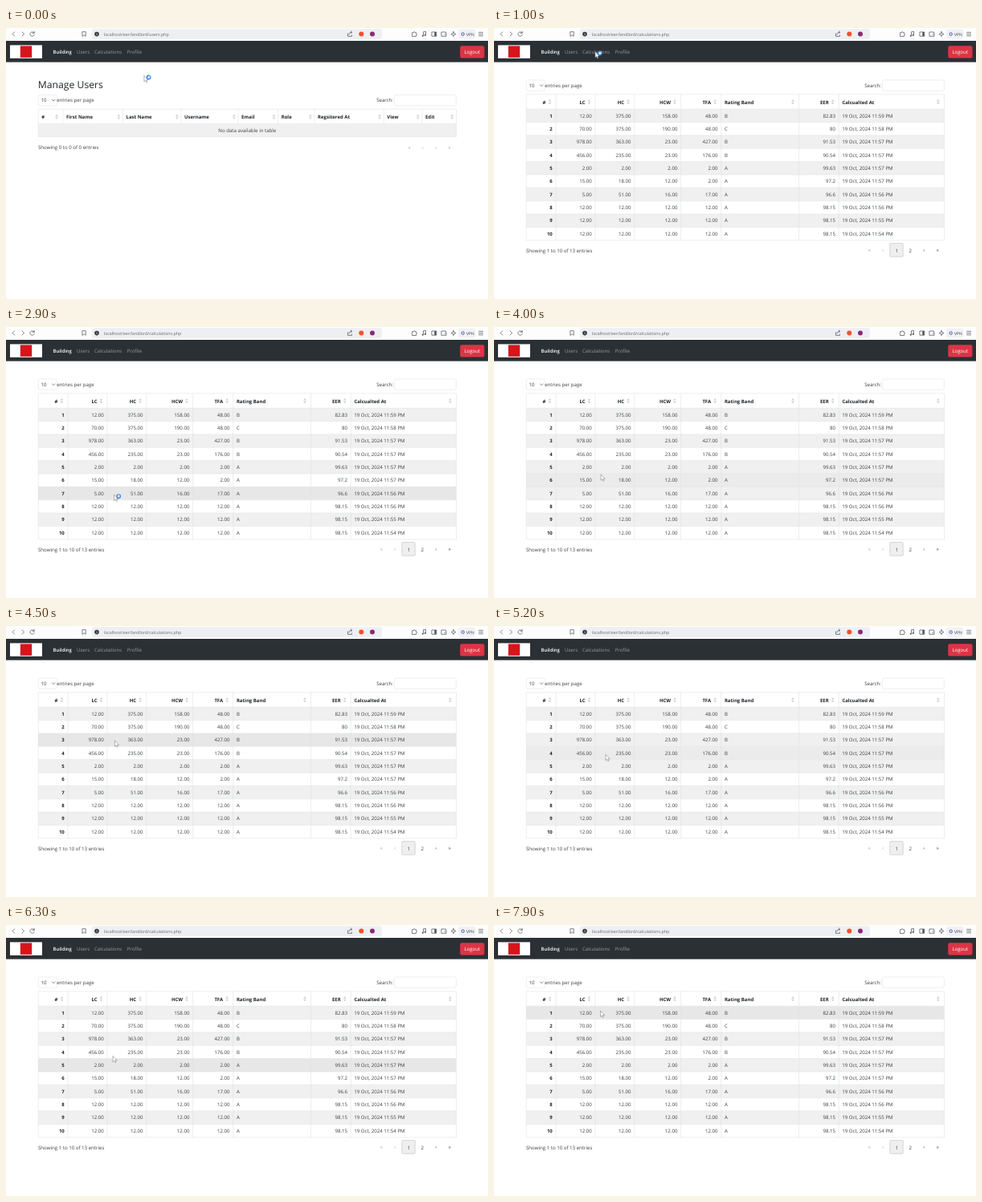
An HTML page that plays this animation: 600x338 px, repeating every 8000 ms.

```html
<!DOCTYPE html>
<html lang="en">
<head>
<meta charset="utf-8">
<title>Landlord dashboard</title>
<style>
html, body { margin: 0; width: 100%; height: 100%; overflow: hidden; background: #fff; }
svg { display: block; width: 100vw; height: 100vh; }
text { font-family: "Open Sans", "Noto Sans", sans-serif; font-size: 6.12px; fill: #3a3e42; text-rendering: geometricPrecision; white-space: pre; }
.b { font-weight: 700; font-size: 6px; fill: #212529; }
.r { text-anchor: end; }
.m { text-anchor: middle; }
.h2 { font-size: 12.2px; font-weight: 500; fill: #212529; }
.nav { font-size: 6.05px; fill: #9b9d9f; }
.on { fill: #fff; font-weight: 600; font-size: 5.95px; }
.url { font-size: 5.28px; fill: #63666b; }
.off { fill: #a0a4a8; }
.line { fill: none; stroke: #dfe2e5; stroke-width: .6; }
.icon { fill: none; stroke: #55585e; stroke-width: .75; stroke-linecap: round; stroke-linejoin: round; }
</style>
</head>
<body>
<svg id="stage" viewBox="0 0 600 338" preserveAspectRatio="none"></svg>
<script>
const LOOP = 8000, SWITCH = 900, BUSY_END = 3250, HOVER_LAG = 50;
const TOP = 101.2, ROW = 16.36;

// time, x, y of the pointer tip
const PATH = [
  [0, 172, 59.5], [600, 124, 28], [900, 126, 29], [1300, 126, 31], [1400, 126, 31],
  [2000, 130, 138], [2100, 130, 144], [2300, 132, 190], [2900, 134.5, 209],
  [3200, 135, 238], [3400, 136, 257], [3600, 136, 250], [4000, 133, 184],
  [4100, 133, 164], [4300, 134, 108], [4600, 136, 160], [5000, 139, 110],
  [5130, 139, 154], [5200, 139, 160], [5600, 138, 256], [5900, 137, 252],
  [6300, 133, 163.5], [6700, 133, 109], [6900, 132.6, 107], [8000, 132.6, 107]
];

const text = (x, y, s, cls = "") => `<text x="${x}" y="${y}" class="${cls}">${s}</text>`;
const rect = (x, y, w, h, fill, extra = "") =>
  `<rect x="${x}" y="${y}" width="${w}" height="${h}" fill="${fill}" ${extra}/>`;
const path = (d, cls, extra = "") => `<path d="${d}" class="${cls}" ${extra}/>`;
const dot = (x, y, r, fill) => `<circle cx="${x}" cy="${y}" r="${r}" fill="${fill}"/>`;
const icon = d => path(d, "icon");
const sort = (x, y) =>
  `<path d="M${x - 1.8} ${y - .6}h3.6l-1.8-2.5zM${x - 1.8} ${y + .6}h3.6l-1.8 2.5z" fill="#cbcdcf"/>`;

function browser() {
  return rect(0, 0, 600, 16, "#fdfdfe") +
    rect(107, 1.3, 361, 12.6, "#eeeff2", 'rx="3"') +
    icon("M10.5 5L8 7.5l2.5 2.5M20 5l2.5 2.5L20 10") +
    icon("M35 6.2a2.7 2.7 0 1 0 .2 2.3M35.2 4.4v2h-2") +
    icon("M95.3 4.7h3.9v5.6l-2-1.6-1.9 1.6z") +
    dot(113, 7.6, 2.8, "#35383d") + rect(112.7, 7.2, .7, 1.9, "#fff") + rect(112.7, 5.9, .7, .7, "#fff") +
    icon("M425.5 7v3.4h5V9M427 8c.2-2 1.4-2.7 3.6-2.7M429.2 3.9l1.5 1.4-1.5 1.4") +
    dot(442.3, 7.6, 3, "#f4512c") + dot(456, 7.6, 3, "#8c2a78") +
    icon("M506 5.6h1.4a.9.9 0 0 1 1.8 0h1.3v1.6a.9.9 0 0 1 0 1.8v1.5H506z") +
    icon("M519.5 9.6V4.8l3-.6v4.7") + dot(518.7, 9.8, 1, "#55585e") + dot(521.7, 9.1, 1, "#55585e") +
    icon("M530.3 5h5.4v5.2h-5.4z") + rect(533.3, 5, 2.4, 5.2, "#55585e") +
    icon("M542.3 5h5v1.2h.7v4.1h-5.7zM546 8.2h1") +
    icon("M557 4.6l.8 2.1 2.2.9-2.2.9-.8 2.1-.8-2.1-2.2-.9 2.2-.9z") +
    rect(563.2, 1.8, 21.2, 11.6, "#f0f1f5", 'rx="3"') +
    `<circle cx="568.7" cy="7.6" r="1.7" fill="none" stroke="#4a55a0" stroke-width="1"/>` +
    `<text x="573" y="9.5" style="font-size:5px">VPN</text>` +
    icon("M588.6 5.4h5M588.6 7.6h5M588.6 9.8h5");
}

function navbar() {
  return rect(0, 16, 600, 26.6, "#2b3035") +
    rect(5, 21.4, 40, 16.4, "#fff") + rect(17.8, 22.4, 14.4, 14.4, "#d8141c") +
    text(58.5, 32.1, "Building", "nav on") + text(88, 32.1, "Users", "nav") +
    text(110, 32.1, "Calculations", "nav") + text(150.7, 32.1, "Profile", "nav") +
    rect(565.3, 22.2, 30.2, 15.2, "#dc3545", 'rx="2.2"') +
    `<text x="580.3" y="32.1" class="m" style="fill:#fff;font-weight:500">Logout</text>`;
}

function controls(y) {
  return rect(40.2, y, 23, 13.4, "#fff", 'class="line" rx="2"') +
    text(43.4, y + 8.9, "10") +
    path(`M57.4 ${y + 6}l1.7 1.7 1.7-1.7`, "icon") +
    text(63.2, y + 8.9, "entries per page") +
    text(482, y + 8.9, "Search:", "r") +
    rect(483.4, y, 77, 13.4, "#fff", 'class="line" rx="2"');
}

const grid = (xs, top, bottom, ys) =>
  path(xs.map(x => `M${x} ${top}V${bottom}`).join("") + ys.map(y => `M40.2 ${y}H560.5`).join(""), "line");

function usersPage() {
  const edges = [40.2, 71, 145.5, 218, 289, 338.7, 384, 470.3, 518, 560.5];
  const names = ["#", "First Name", "Last Name", "Username", "Email", "Role", "Regsitered At", "View", "Edit"];
  const heads = names.map((n, i) =>
    text(edges[i] + 4, 112.9, n, "b") + sort(edges[i + 1] - (i ? 5.2 : 8), 110.8)).join("");
  return text(121.8, 9.5, "localhost/eer/landlord/users.php", "url") +
    text(39.8, 75, "Manage Users", "h2") + controls(83.4) +
    rect(40.2, 119.6, 520.3, 16, "#f0f0f0") +
    grid(edges, 101.2, 119.6, [101.2, 119.6, 135.6]) + path("M40.2 119.6v16M560.5 119.6v16", "line") +
    heads + text(300.3, 130.1, "No data available in table", "m") +
    text(40, 150.9, "Showing 0 to 0 of 0 entries") +
    ["«", "‹", "›", "»"].map((s, i) => text(502.3 + i * 16.6, 150.7, s, "m off")).join("");
}

function calculationsPage() {
  const edges = [40.2, 77, 126, 174.7, 232.6, 282.7, 379.5, 429.2, 560.5];
  const names = ["#", "LC", "HC", "HCW", "TFA", "Rating Band", "EER", "Calcualted At"];
  const twelve = "12.00 12.00 12.00 12.00 A 98.15 11:";
  const rows = [
    "12.00 375.00 158.00 48.00 B 82.83 11:59", "70.00 375.00 190.00 48.00 C 80 11:58",
    "978.00 363.00 23.00 427.00 B 91.53 11:57", "456.00 235.00 23.00 176.00 B 90.54 11:57",
    "2.00 2.00 2.00 2.00 A 99.63 11:57", "15.00 18.00 12.00 2.00 A 97.2 11:57",
    "5.00 51.00 16.00 17.00 A 96.6 11:56", twelve + "56", twelve + "55", twelve + "54"
  ];
  const left = i => i === 5 || i === 7;
  const heads = names.map((n, i) =>
    (left(i) ? text(edges[i] + 4.2, 94.5, n, "b") : text(edges[i + 1] - 12.5, 94.5, n, "b r")) +
    sort(edges[i + 1] - 7.6, 92.2)).join("");
  const body = rows.map((row, k) => {
    const y = TOP + k * ROW, base = (y + 10.4).toFixed(2);
    const cells = [k + 1, ...row.split(" ")].map((v, i) =>
      i === 7 ? text(433.2, base, `19 Oct, 2024 ${v} PM`) :
      left(i) ? text(edges[i] + 4.2, base, v) :
      text(edges[i + 1] - 4.2, base, v, i ? "r" : "b r")).join("");
    return rect(40.2, y, 520.3, ROW, "#fff", 'data-row') + cells;
  }).join("");
  const end = TOP + rows.length * ROW;
  const lines = rows.map((_, k) => TOP + k * ROW);
  const pages = ["«", "‹", "1", "2", "›", "»"].map((s, i) =>
    text(467.2 + i * 17, i === 2 || i === 3 ? 279.6 : 279.2, s, i < 2 ? "m off" : "m")).join("");
  return text(121.8, 9.5, "localhost/eer/landlord/calculations.php", "url") +
    controls(64.9) + body + grid(edges, 82.8, end, [82.8, ...lines, end]) + heads +
    text(40, 279.7, "Showing 1 to 10 of 13 entries") +
    rect(492.8, 268.6, 16.4, 16.6, "#efefef", 'stroke="#bfbfbf" stroke-width=".6" rx="1"') + pages;
}

const pointer = `<g id="pointer">
  <path d="M0 0V7.4L1.7 5.9 2.8 8.4 3.9 7.9 2.9 5.5H5.2Z" fill="#fff" stroke="#6b6d70" stroke-width=".5"/>
  <g id="busy" transform="translate(5.7 2)">
    <circle r="2.2" fill="#fff" stroke="#2f7fdc" stroke-width="1.3"/>
    <path id="spin" d="M0-2.2A2.2 2.2 0 0 1 2.2 0" fill="none" stroke="#7fb8f4" stroke-width="1.3"/>
  </g></g>`;

const $ = id => document.getElementById(id);
$("stage").innerHTML = rect(0, 0, 600, 338, "#fff") + browser() + navbar() +
  `<g id="users">${usersPage()}</g><g id="calc">${calculationsPage()}</g>` + pointer;
const bands = [...document.querySelectorAll("[data-row]")];
const show = (id, on) => $(id).setAttribute("display", on ? "inline" : "none");

function tip(t) {
  const i = Math.max(1, PATH.findIndex(p => p[0] >= t));
  const [t0, x0, y0] = PATH[i - 1], [t1, x1, y1] = PATH[i];
  const k = Math.max(0, (t - t0) / (t1 - t0));
  return [x0 + (x1 - x0) * k, y0 + (y1 - y0) * k];
}

function draw(t) {
  const [x, y] = tip(t);
  const hover = Math.floor((tip(Math.max(0, t - HOVER_LAG))[1] - TOP) / ROW);
  show("users", t < SWITCH);
  show("calc", t >= SWITCH);
  show("busy", t < BUSY_END);
  $("pointer").setAttribute("transform", `translate(${x.toFixed(2)} ${y.toFixed(2)})`);
  $("spin").setAttribute("transform", `rotate(${t * .36 % 360})`);
  bands.forEach((b, k) => b.setAttribute("fill",
    k === hover ? (k % 2 ? "#ebebeb" : "#e7e7e7") : k % 2 ? "#fff" : "#f0f0f0"));
}

const start = performance.now();
function tick(now) {
  draw(Math.max(0, now - start) % LOOP);
  requestAnimationFrame(tick);
}
draw(0);
requestAnimationFrame(tick);
</script>
</body>
</html>
```
